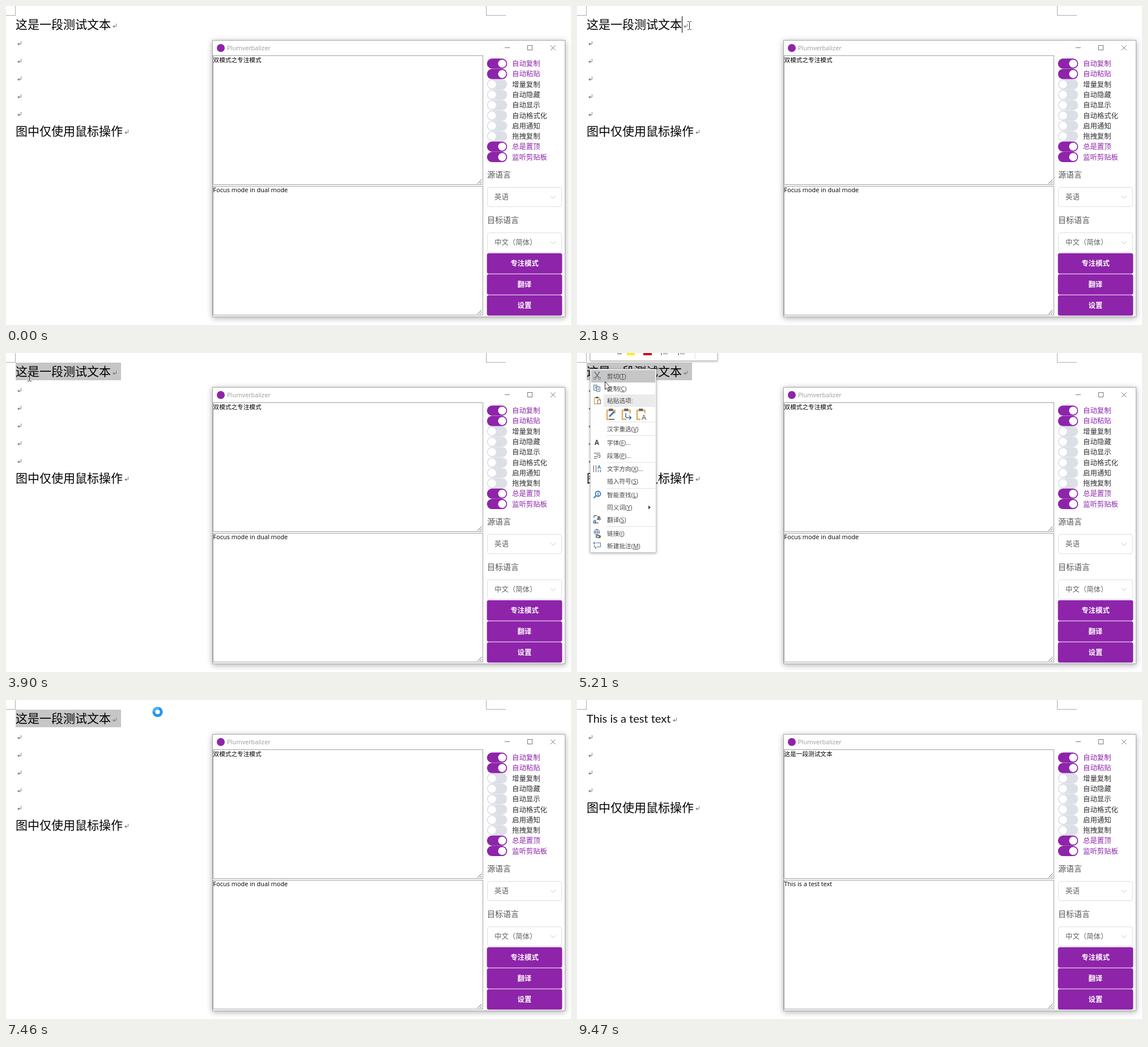
Recreate the animation shown at these times as an HTML page with a canvas. Size 997 px wide and 562 px high, loop 9.89 s.

```html
<!DOCTYPE html>
<html lang="zh-CN">
<head>
<meta charset="utf-8">
<title>Translate and paste</title>
<style>
html, body { margin: 0; width: 100%; height: 100%; overflow: hidden; background: #fff; }
canvas { display: block; }
</style>
</head>
<body>
<canvas id="stage" width="997" height="562"></canvas>
<script>
const ctx = document.getElementById('stage').getContext('2d');
const LOOP = 9890;
const CJK = '"Noto Sans CJK SC", "Noto Sans CJK JP", "Noto Sans CJK", sans-serif';
const UI = '"Open Sans", ' + CJK;
const DOC = 'Lato, ' + CJK;
const PURPLE = '#8e24aa', PALE = '#dcdfe6', MARK = '#7f7f7f';

// Pointer moves: start, end, number of steps, target x, target y, shape
const moves = [
  [70, 70, 1, 411, 193, 'beam'],
  [145, 220, 2, 73, 92, 'beam'],
  [360, 500, 3, 62, 93, 'beam'],
  [560, 800, 4, 211, 36, 'beam'],
  [960, 960, 1, 205, 35, 'beam'],
  [1310, 1370, 2, 196, 43, 'beam'],
  [1540, 1540, 1, 193, 36, 'beam'],
  [2180, 2180, 1, 198, 34, 'beam'],
  [2260, 2410, 3, 204, 31, 'beam'],
  [2560, 3340, 11, 15, 32, 'beam'],
  [3840, 3900, 2, 41, 42, 'beam'],
  [4020, 4020, 1, 46, 49, 'beam'],
  [4180, 4380, 3, 49, 50, 'arrow'],
  [5300, 5440, 3, 63, 64, 'arrow'],
  [6090, 6570, 6, 267, 21, 'arrow'],
  [6730, 6730, 1, 267.5, 21, 'busy'],
  [7880, 7880, 1, 267, 23, 'beam'],
  [8810, 9400, 8, 913, 479, 'beam'],
  [9470, 9470, 1, 913, 479, 'none']
];

const within = (t, from, to) => t >= from && t < to;

function rect(x, y, w, h, color) {
  ctx.fillStyle = color;
  ctx.fillRect(x, y, w, h);
}

function frame(x, y, w, h, color) {
  ctx.strokeStyle = color;
  ctx.lineWidth = 1;
  ctx.strokeRect(x + .5, y + .5, w - 1, h - 1);
}

function round(x, y, w, h, r, fill, line) {
  ctx.beginPath();
  ctx.roundRect(x, y, w, h, r);
  ctx.fillStyle = fill;
  ctx.fill();
  if (line) {
    ctx.strokeStyle = line;
    ctx.lineWidth = 1;
    ctx.stroke();
  }
}

function dot(x, y, r, color) {
  ctx.beginPath();
  ctx.arc(x, y, r, 0, 2 * Math.PI);
  ctx.fillStyle = color;
  ctx.fill();
}

function stroke(path, color, width = 1) {
  ctx.strokeStyle = color;
  ctx.lineWidth = width;
  ctx.stroke(new Path2D(path));
}

// y is the middle of the line; returns the width
function text(str, x, y, size, color, { font = UI, weight = 400, align = 'left' } = {}) {
  ctx.font = `${weight} ${size}px ${font}`;
  ctx.textAlign = align;
  ctx.fillStyle = color;
  ctx.fillText(str, x, Math.round(y + size * .38));
  return ctx.measureText(str).width;
}

function panel(x, y, w, h, blur, line) {
  ctx.save();
  ctx.shadowColor = 'rgba(0,0,0,.32)';
  ctx.shadowBlur = blur;
  ctx.shadowOffsetY = blur / 5;
  rect(x, y, w, h, '#fff');
  ctx.restore();
  frame(x, y, w, h, line);
}

function returnMark(x, y) {
  stroke(`M${x + 6.5} ${y - 4}v5H${x + 1}`, MARK);
  ctx.fillStyle = MARK;
  ctx.fill(new Path2D(`M${x} ${y + 1}l3.5 -2.5v5z`));
}

function drawDocument(pasted, selectedFrom) {
  rect(0, 16, 17, 1, '#ababab');
  rect(16, 0, 1, 17, '#ababab');
  rect(847, 0, 1, 17, '#ababab');
  rect(847, 16, 35, 1, '#ababab');
  if (selectedFrom < 203) rect(selectedFrom, 17, 203 - selectedFrom, 31, '#c6c6c6');

  if (pasted) text('This is a test text', 17, 32.5, 20, '#111', { font: DOC });
  else text('这是一段测试文本', 17, 32.5, 21, '#000', { font: CJK });
  returnMark(pasted ? 169 : 188, 35);

  const blanks = pasted ? 4 : 5;
  for (let i = 0; i < blanks; i++) returnMark(20, 66 + i * 31.2);
  const last = 64 + blanks * 31.2;
  text('图中仅使用鼠标操作', 17, last, 21, '#000', { font: CJK });
  returnMark(209, last + 2);
}

function drawTextArea(y) {
  rect(365, y, 477, 228, '#fff');
  frame(365, y, 477, 228, '#a0a0a0');
  const b = y + 226;
  stroke(`M832 ${b}l7.5 -7.5M836 ${b}l3.5 -3.5`, '#666');
}

function drawSelect(label, value, y) {
  text(label, 849, y - 22, 14, '#555', { font: CJK });
  round(849.5, y + .5, 131, 34, 3.5, '#fff', PALE);
  text(value, 862, y + 17.5, 12.4, '#606266', { font: CJK });
  stroke(`M961 ${y + 15.5}l4.5 4.5l4.5 -4.5`, '#c0c4cc');
}

function drawWindow(sourceText, resultText) {
  panel(364, 60, 623, 488, 10, '#a6a6a6');
  dot(379, 74, 7, PURPLE);
  text('Plumverbalizer', 390, 74, 11, '#999');
  stroke('M880 73.5h9M961 69.5l8.5 8.5M969.5 69.5l-8.5 8.5', '#777');
  frame(920, 69, 9, 9, '#777');

  drawTextArea(87);
  drawTextArea(317);
  text(sourceText, 365.5, 94.5, 10.65, '#000', { font: CJK });
  text(resultText, 365.5, 324, 10.95, '#000');

  const options = ['自动复制', '自动粘贴', '增量复制', '自动隐藏', '自动显示',
    '自动格式化', '启用通知', '拖拽复制', '总是置顶', '监听剪贴板'];
  options.forEach((label, i) => {
    const on = i < 2 || i > 7, y = 101.5 + i * 18.28;
    round(848.7, y - 9, 35.6, 18, 9, on ? PURPLE : PALE);
    dot(on ? 875.5 : 857.5, y, 7.1, '#fff');
    text(label, 893, y, 12.4, on ? PURPLE : '#303133', { font: CJK });
  });

  drawSelect('源语言', '英语', 319);
  drawSelect('目标语言', '中文（简体）', 399);
  ['专注模式', '翻译', '设置'].forEach((label, i) => {
    const y = 435.6 + i * 37;
    round(848.6, y, 132.8, 35.8, 3.5, PURPLE);
    text(label, 915, y + 18, 12.4, '#fff', { font: CJK, weight: 700, align: 'center' });
  });
}

function drawToolbar() {
  panel(23, -20, 225, 34, 4, '#c6c6c6');
  rect(71, 1, 8, 1, '#555');
  rect(88, 0, 14, 4, '#fbee23');
  rect(117, 0, 15, 4, '#d0101b');
  for (const x of [148, 178]) {
    rect(x, 1, 2, 2, '#555');
    rect(x + 4, 1, 8, 1, '#777');
  }
  rect(208, 0, 1, 10, '#ddd');
}

function clipboard(x, y, s) {
  ctx.save();
  ctx.translate(x, y);
  ctx.scale(s, s);
  round(0, 2, 14, 16, 1, '#fff');
  stroke('M8 18H1V3H14V8', '#e3b169', 2.5);
  rect(4, 0, 7, 4, '#666');
  ctx.restore();
}

function drawMenuIcons() {
  stroke('M31 33l7 10M40 33l-7 10', '#555', 1.3);
  stroke('M33.5 44.5a2 2 0 1 0 -4 0a2 2 0 1 0 4 0M41.5 44.5a2 2 0 1 0 -4 0a2 2 0 1 0 4 0', '#54779b');
  stroke('M29.5 56.5h6v9h-6zM31 59h3M31 61.5h3', '#4a6e94');
  rect(34, 59, 8, 9, '#fff');
  stroke('M34.5 59.5h6v8h-6zM36 62h3M36 64.5h3', '#4a6e94');

  clipboard(30, 77, .7);
  rect(36, 82, 6, 8, '#fff');
  frame(36, 82, 6, 8, '#666');
  [52, 79, 105].forEach(x => clipboard(x, 98, 1.05));
  stroke('M57 112l9 -9', '#4a78ad', 3);
  stroke('M57 117h9', '#777', 2);
  stroke('M86 106v6q0 2 3 2h6M92 110.5l3.5 3.5l-3.5 3.5', '#2e75b6', 1.6);
  rect(112, 106, 11, 13, '#fff');
  text('A', 118, 113, 13, '#444', { align: 'center' });

  text('A', 35, 157.5, 11.5, '#444', { weight: 700, align: 'center' });
  stroke('M30 176.5h11M34 179.5h7M30 182.5h7M30 185.5h5M40.5 179v5h-3', '#555');
  stroke('M29.5 198v12M33.5 198v12M37.5 206v4M41.5 206v4', '#555');
  text('A', 39, 201, 9, '#2e75b6', { weight: 700, align: 'center' });
  stroke('M41.5 248a4.5 4.5 0 1 0 -9 0a4.5 4.5 0 1 0 9 0M33.5 251.5l-4 4', '#2e75b6', 1.8);
  rect(36.5, 246, 1.5, 5, '#2e75b6');
  text('a', 31, 296, 11, '#2e75b6', { weight: 700, align: 'center' });
  text('あ', 38.5, 291, 8, '#333', { font: CJK, weight: 700, align: 'center' });
  stroke('M31 299.5h7M35 286.5h-5v4', '#333');
  stroke('M40 315.5a5 5 0 1 0 -10 0a5 5 0 1 0 10 0M30 315.5h10M35 310.5q-4 5 0 10q4 -5 0 -10', '#4a6e94');
  stroke('M34 322h3a2 2 0 1 1 0 3h-3zM38 322h3v3h-3', '#333', 1.2);
  stroke('M34 334.5h7.5v7h-6l-3 3v-3h-2v-3M28 335h5M30.5 332.5v5', '#4a6e94');
}

const menuItems = [
  ['剪切(', 'T', ')', 41], ['复制(', 'C', ')', 62.5], ['汉字重选(', 'V', ')', 134],
  ['字体(', 'F', ')...', 158], ['段落(', 'P', ')...', 181], ['文字方向(', 'X', ')...', 204],
  ['插入符号(', 'S', ')', 226], ['智能查找(', 'L', ')', 250], ['同义词(', 'Y', ')', 272],
  ['翻译(', 'S', ')', 294], ['链接(', 'I', ')', 318], ['新建批注(', 'M', ')', 340]
];

function drawMenu(hoverY) {
  panel(23, 28, 117, 324, 5, '#c6c6c6');
  if (hoverY) rect(25, hoverY, 113, 22, '#c6c6c6');
  rect(47, 73, 91, 22, '#ebebeb');
  text('粘贴选项:', 53, 84, 10.7, '#444', { weight: 500 });
  for (const y of [121, 145, 192, 238, 305]) rect(52, y, 86, 1, '#e1e1e1');
  for (const [before, key, after, y] of menuItems) {
    const x = 53 + text(before, 53, y, 10.7, '#444');
    const w = text(key, x, y, 10.7, '#444');
    text(after, x + w, y, 10.7, '#444');
    rect(x, Math.round(y + 5), w, 1, '#444');
  }
  ctx.fillStyle = '#444';
  ctx.fill(new Path2D('M126 268.5l4 3.5l-4 3.5z'));
  drawMenuIcons();
}

function pointerAt(t) {
  let x = 0, y = 0, shape = 'none';
  for (const [start, end, steps, tx, ty, kind] of moves) {
    if (t < start) break;
    const done = t >= end ? 1 : (1 + Math.floor((t - start) / (end - start) * (steps - 1))) / steps;
    x += (tx - x) * done;
    y += (ty - y) * done;
    shape = kind;
  }
  if (shape === 'beam' && x > 841) shape = 'arrow';
  return { x, y, shape };
}

function drawPointer({ x, y, shape }) {
  ctx.save();
  ctx.translate(Math.round(x), Math.round(y));
  if (shape === 'beam') {
    stroke('M-3 -6.5h2.5l1 1l1 -1h2.5M.5 -6v13M-3 7.5h2.5l1 -1l1 1h2.5', '#333');
  } else if (shape === 'arrow') {
    const arrow = new Path2D('M.5 .5V14.5L3.7 11.5L6 16.5L8.3 15.5L6 10.6H10.2Z');
    ctx.fillStyle = '#fff';
    ctx.fill(arrow);
    ctx.strokeStyle = '#222';
    ctx.lineWidth = 1;
    ctx.stroke(arrow);
  } else if (shape === 'busy') {
    ctx.beginPath();
    ctx.arc(-.5, 0, 6.6, 0, 2 * Math.PI);
    ctx.strokeStyle = '#2593ec';
    ctx.lineWidth = 5;
    ctx.stroke();
    ctx.beginPath();
    ctx.arc(-.5, 0, 6.6, Math.PI, 1.6 * Math.PI);
    ctx.strokeStyle = '#49b4fa';
    ctx.stroke();
  }
  ctx.restore();
}

function draw(t) {
  const pointer = pointerAt(t);
  const pasted = t >= 7740;
  let selectedFrom = 203;
  if (within(t, 2560, 7740)) {
    const cell = t < 3340 ? Math.round((pointer.x - 17) / 21) : 0;
    selectedFrom = 17 + 21 * Math.max(0, Math.min(8, cell));
  }

  rect(0, 0, 997, 562, '#fff');
  drawDocument(pasted, selectedFrom);
  if (within(t, 1860, 2560)) rect(185, 18, 1, 29, '#000');
  if (within(t, 7740, 8350) || within(t, 8880, 9400)) rect(165, 18, 1, 29, '#000');
  if (within(t, 8350, 8430)) rect(165, 18, 1, 29, '#999');

  drawWindow(t < 7530 ? '双模式之专注模式' : '这是一段测试文本',
    t < 7600 ? 'Focus mode in dual mode' : 'This is a test text');

  if (within(t, 3590, 3840)) {
    ctx.globalAlpha = .6;
    drawToolbar();
    ctx.globalAlpha = 1;
  }
  if (within(t, 4760, 6250)) drawToolbar();
  if (within(t, 4920, 5770)) {
    ctx.globalAlpha = t < 5680 ? 1 : .5;
    drawMenu(t < 5070 ? 0 : t < 5370 ? 30 : 51);
    ctx.globalAlpha = 1;
  }
  if (within(t, 5770, 5910)) rect(22, 48, 1, 304, '#e2e2e2');
  drawPointer(pointer);
}

const begin = performance.now();
function tick() {
  draw((performance.now() - begin) % LOOP);
  requestAnimationFrame(tick);
}
tick();
</script>
</body>
</html>
```
